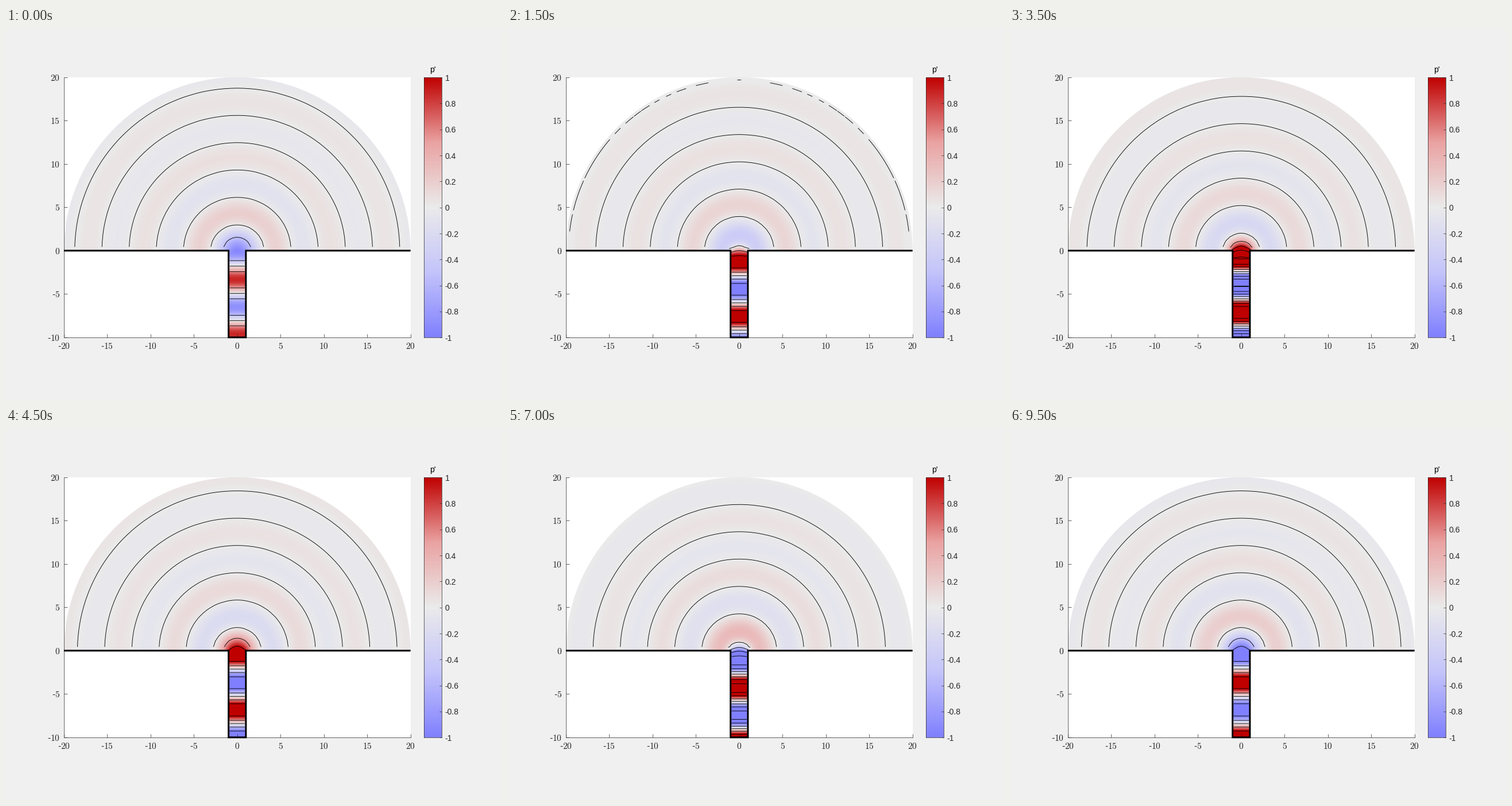
A matplotlib script that plays this animation: 864 by 648 pixels, repeating every 10000 ms.

```python
import numpy as np
import matplotlib.pyplot as plt
from matplotlib.animation import FuncAnimation
from matplotlib.colors import LinearSegmentedColormap
from matplotlib.patches import Wedge

W, H, DPI = 864, 648, 72
FRAMES, INTERVAL = 20, 500

plt.rcParams.update({"font.family": "Liberation Sans", "mathtext.fontset": "cm"})

# Plane wave in a duct of radius 1 (k = 1) radiating through a flanged opening
AMPLITUDE = 1.375
IMPEDANCE = 0.4233 - 0.6468j
REFLECTION = (IMPEDANCE - 1) / (IMPEDANCE + 1)
VELOCITY = AMPLITUDE * (1 - REFLECTION)
PHASE = np.exp(-0.5j * np.angle(REFLECTION))


def radiated(rho, z, steps=48):
    """Baffled piston field written as an integral along its rim."""
    total = np.zeros(np.shape(rho), complex)
    direct = np.exp(1j * z)
    for phi in (np.arange(steps) + 0.5) * np.pi / steps:
        gap = 1 + rho**2 - 2 * rho * np.cos(phi)
        rim = np.exp(1j * np.sqrt(z**2 + gap))
        total += (1 - rho * np.cos(phi)) / gap * (rim - direct)
    return -VELOCITY * total / steps


def in_duct(rho, y):
    plane = AMPLITUDE * (np.exp(1j * y) + REFLECTION * np.exp(-1j * y))
    profile = radiated(rho, 0 * y) - IMPEDANCE * VELOCITY
    return plane + profile * np.exp(3.7 * np.minimum(y, 0))


def field(x, y):
    rho = np.abs(x)
    return PHASE * np.where(y >= 0, radiated(rho, np.maximum(y, 0)), in_duct(rho, y))


def pixel_field(x0, x1, y0, y1, nx, ny):
    xs = x0 + (np.arange(nx) + 0.5) * (x1 - x0) / nx
    ys = y0 + (np.arange(ny) + 0.5) * (y1 - y0) / ny
    return field(*np.meshgrid(xs, ys))


def rgb(*values):
    return tuple(v / 255 for v in values)


cmap = LinearSegmentedColormap.from_list("pressure", [
    rgb(128, 128, 255), rgb(196, 196, 251), rgb(235, 235, 235),
    rgb(234, 162, 162), rgb(191, 0, 0)], N=256)

fig = plt.figure(figsize=(W / DPI, H / DPI), dpi=DPI, facecolor=rgb(240, 240, 240))


def add_axes(left, top, right, bottom):
    return fig.add_axes([left / W, 1 - bottom / H, (right - left) / W, (bottom - top) / H])


INK = rgb(38, 38, 38)
ax = add_axes(100.9, 85.7, 704.7, 538.9)
ax.set(xlim=(-20, 20), ylim=(-10, 20))
ax.spines[["top", "right"]].set_visible(False)
for side in ("left", "bottom"):
    ax.spines[side].set(color=INK, linewidth=0.7)


def tick_label(value):
    return ("-" if value < 0 else "") + f"${abs(value)}$"


xticks, yticks = range(-20, 21, 5), range(-10, 21, 5)
ax.set_xticks(xticks, [tick_label(v) for v in xticks])
ax.set_yticks(yticks, [tick_label(v) for v in yticks])
ax.tick_params(direction="in", length=6, width=0.7, color=INK, labelcolor=INK,
               labelsize=15.5, pad=7)
ax.tick_params(axis="x", pad=8)

# Pressure images: half-disc above the wall, strip inside the duct
parts = []
for box, shape in (((-20, 20, 0, 20), (604, 302)), ((-1, 1, -10, 0), (30, 151))):
    values = pixel_field(*box, *shape)
    image = ax.imshow(values.real, extent=box, origin="lower", cmap=cmap, vmin=-1, vmax=1,
                      interpolation="bilinear", aspect="auto", zorder=1)
    parts.append((image, values))
parts[0][0].set_clip_path(Wedge((0, 0), 20, 0, 180, transform=ax.transData))

ax.plot([-20, -1, -1, 1, 1, 20], [0, 0, -10, -10, 0, 0], color="black", lw=3,
        solid_capstyle="butt", solid_joinstyle="miter", clip_on=False, snap=False, zorder=4)

# Isobars come from a coarser rectangular grid
gx, gy = np.meshgrid(np.linspace(-20, 20, 93), np.linspace(-10, 20, 47))
inside = np.where(gy > 0, np.hypot(gx, gy) <= 20 + 1e-9, np.abs(gx) < 1)
grid = np.ma.array(field(gx, gy), mask=~inside)
levels = np.arange(-3, 3.1, 0.5)

# Colour scale, drawn slightly past its frame so that no seam shows
bar = add_axes(728.2, 86.2, 759.2, 539.2)
bar.imshow(np.linspace(-1.02, 1.02, 512)[:, None], extent=(-0.1, 1.1, -1.02, 1.02),
           origin="lower", cmap=cmap, vmin=-1, vmax=1, aspect="auto")
bar.set(xlim=(0, 1), ylim=(-1, 1))
bar.set_xticks([])
bar_ticks = np.arange(-5, 6) / 5
bar.set_yticks(bar_ticks, [f"{v:g}" for v in bar_ticks])
bar.yaxis.tick_right()
bar.tick_params(direction="in", length=4, width=0.7, color=INK, labelcolor=INK,
                labelsize=14, pad=5.5)
for spine in bar.spines.values():
    spine.set(color=INK, linewidth=0.7)
fig.text(743.2 / W, 1 - 77.2 / H, "p'", fontsize=14, ha="center", va="baseline")

isobars = []


def draw(frame):
    turn = np.exp(-2j * np.pi * (frame - 6) / FRAMES)
    for image, values in parts:
        image.set_data((values * turn).real)
    while isobars:
        isobars.pop().remove()
    lines = ax.contour(gx, gy, (grid * turn).real, levels=levels, colors="black",
                       linewidths=0.9, linestyles="solid", zorder=3)
    lines.set_snap(False)
    isobars.append(lines)
    return [image for image, _ in parts]


anim = FuncAnimation(fig, draw, frames=FRAMES, interval=INTERVAL, init_func=lambda: draw(0),
                     repeat=True, repeat_delay=0, blit=False)
plt.show()
```
